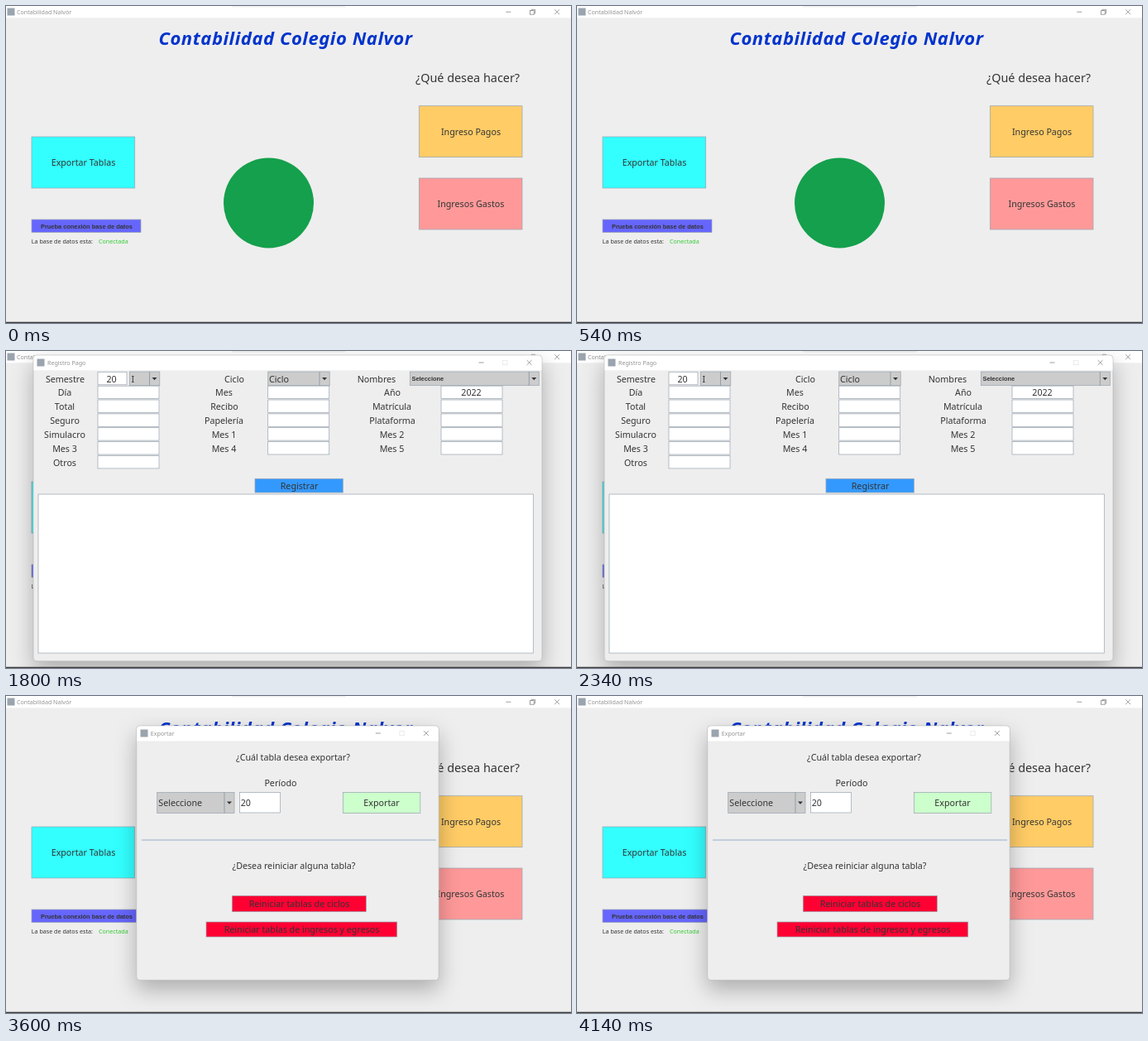
An HTML page that plays this animation: 683x383 px, repeating every 4.5 s.

```html
<!DOCTYPE html>
<html lang="es">
<head>
<meta charset="utf-8">
<title>Contabilidad</title>
<style>
html, body { margin: 0; width: 100%; height: 100%; overflow: hidden; background: #eee; }
svg { display: block; width: 100vw; height: 100vh; }
text { font: 10.7px "Noto Sans", sans-serif; fill: #333; text-anchor: middle; }
.l, .cap, .small { text-anchor: start; }
.cap { font-size: 7.1px; fill: #939393; }
.small { font-size: 7.15px; }
.ask { font-size: 14.4px; }
.bold { font: bold 7.4px "Liberation Sans", Arial, sans-serif; }
.title { font: italic 600 22px "Noto Sans", sans-serif; letter-spacing: .55px; fill: #03c; }
.sub { font: italic 600 10.8px "Noto Sans", sans-serif; letter-spacing: .3px; }
.box { stroke: #97a3af; stroke-width: .7; }
.field { fill: #fff; }
.combo { fill: #ccc; }
.cell { width: 74px; height: 15.4px; }
.line { stroke: #7a8a99; stroke-width: .7; }
.icon { fill: #9aa4ae; width: 9px; height: 9px; }
.ctl { fill: none; stroke: #858585; stroke-width: .8; }
.frame { fill: #eee; stroke: #b8b8b8; stroke-width: .7; }
.win { opacity: 0; animation: show 4.5s step-end infinite; }
.win > .frame { filter: drop-shadow(0 11px 13px rgba(0, 0, 0, .27)); }
#pagos { animation-delay: -3.6s; }
#pago { animation-delay: -2.7s; }
#gasto { animation-delay: -1.8s; }
#exportar { animation-delay: -.9s; }
@keyframes show {
  0% { opacity: 1; }
  20%, 100% { opacity: 0; }
}
</style>
</head>
<body>
<svg viewBox="0 0 683 383" preserveAspectRatio="none">
  <defs>
    <!-- placed at the right edge and middle of a title bar -->
    <g id="ctl" class="ctl">
      <path d="M-76.500 0h6M-18.300-2.900l5.800 5.800m0-5.800l-5.800 5.800"/>
      <rect x="-47.500" y="-2.700" width="5.400" height="5.400" stroke="#e6e6e6"/>
    </g>
    <path id="arrow" d="M-3-1.600h6l-3 3.400z" fill="#333"/>
  </defs>

  <!-- main window -->
  <rect width="683" height="383" fill="#eee"/>
  <rect width="683" height="14.300" fill="#fff"/>
  <rect x="273" width="138" height="1.500" rx=".7" fill="#f0f0f0"/>
  <rect class="icon" x="1.500" y="2.500"/>
  <text class="cap" x="13" y="9.800">Contabilidad Nalvór</text>
  <g class="ctl">
    <path d="M604.300 7.200h6M663.200 4.300l5.800 5.800m0-5.800l-5.800 5.800M635 5.500v-1.200h4.600v4.600h-1.200"/>
    <rect x="633.600" y="5.600" width="4.600" height="4.600"/>
  </g>
  <text class="title" x="338" y="47.300">Contabilidad Colegio Nalvor</text>
  <text class="ask" x="558" y="92">¿Qué desea hacer?</text>
  <circle cx="317.500" cy="238" r="54.500" fill="#14a04c"/>

  <rect class="box" x="31" y="158" width="124.700" height="62" fill="#3ff"/>
  <text x="93.500" y="193">Exportar Tablas</text>
  <rect class="box" x="499.300" y="120.700" width="124.700" height="62" fill="#fc6"/>
  <text x="562" y="156">Ingreso Pagos</text>
  <rect class="box" x="499.300" y="208" width="124.700" height="62" fill="#f99"/>
  <text x="562" y="243.300">Ingresos Gastos</text>
  <rect class="box" x="31" y="258" width="132" height="15.500" fill="#66f"/>
  <text class="bold" x="97.500" y="268.900">Prueba conexión base de datos</text>
  <text class="small" x="30.800" y="287">La base de datos esta:</text>
  <text class="small" x="112" y="287" style="fill:#3c3">Conectada</text>

  <g id="pagos" class="win">
    <rect class="frame" x="95.500" y="36" width="490.500" height="307.300" rx="4"/>
    <path d="M96 54.500V40q0-3.600 3.600-3.600h482.300q3.600 0 3.600 3.600v14.500z" fill="#fff"/>
    <rect class="icon" x="100" y="40.500"/>
    <text class="cap" x="112" y="47.900">Pagos</text>
    <use href="#ctl" x="586" y="45"/>
    <text class="sub" x="332.500" y="80.300">¿Qué desea hacer?</text>
    <rect class="box" x="126.300" y="116.500" width="172.700" height="62.200" fill="#cf6"/>
    <text x="212.500" y="152">Crear estudiante</text>
    <rect class="box" x="376" y="116.500" width="172.700" height="62.200" fill="#ccf"/>
    <text x="462" y="152">Registrar Pago</text>
    <rect class="box" x="198" y="241" width="293.300" height="62.500" fill="#999"/>
    <text x="345" y="277">Registrar otros pagos o semestres anteriores</text>
  </g>

  <g id="pago" class="win">
    <rect class="frame" x="33" y="5" width="615" height="369.700" rx="4"/>
    <path d="M33.500 23.300V9q0-3.600 3.600-3.600h606.800q3.600 0 3.600 3.600v14.300z" fill="#fff"/>
    <rect class="icon" x="37.500" y="9.500"/>
    <text class="cap" x="50" y="16.800">Registro Pago</text>
    <use href="#ctl" x="648" y="14"/>

    <text x="71.500" y="37.700">Semestre</text>
    <rect class="box field" x="111" y="25.300" width="35" height="15.500"/>
    <text x="127.500" y="37.700">20</text>
    <rect class="box combo" x="149.300" y="25" width="36.500" height="16.700"/>
    <text class="l" x="151.500" y="37.700">I</text>
    <path class="line" d="M173.500 25v16.700"/>
    <use href="#arrow" x="179.500" y="33.500"/>
    <text x="276" y="37.700">Ciclo</text>
    <rect class="box combo" x="316.700" y="25" width="74.500" height="16.700"/>
    <text class="l" x="318" y="37.700">Ciclo</text>
    <path class="line" d="M379 25v16.700"/>
    <use href="#arrow" x="385" y="33.500"/>
    <text x="448" y="37.700">Nombres</text>
    <rect class="box combo" x="488.300" y="25" width="156" height="16.700"/>
    <text class="l bold" x="490.500" y="36.300">Seleccione</text>
    <path class="line" d="M632.300 25v16.700"/>
    <use href="#arrow" x="638.300" y="33.500"/>

    <g class="box field">
      <rect class="cell" x="111" y="42.200"/><rect class="cell" x="316.700" y="42.200"/><rect class="cell" x="526" y="42.200"/>
      <rect class="cell" x="111" y="59"/><rect class="cell" x="316.700" y="59"/><rect class="cell" x="526" y="59"/>
      <rect class="cell" x="111" y="75.900"/><rect class="cell" x="316.700" y="75.900"/><rect class="cell" x="526" y="75.900"/>
      <rect class="cell" x="111" y="92.700"/><rect class="cell" x="316.700" y="92.700"/><rect class="cell" x="526" y="92.700"/>
      <rect class="cell" x="111" y="109.600"/><rect class="cell" x="316.700" y="109.600"/><rect class="cell" x="526" y="109.600"/>
      <rect class="cell" x="111" y="126.500"/>
    </g>
    <text x="71" y="54.400">Día</text><text x="263.500" y="54.400">Mes</text><text x="467" y="54.400">Año</text>
    <text x="562.500" y="54.400">2022</text>
    <text x="71" y="71.300">Total</text><text x="264" y="71.300">Recibo</text><text x="466.500" y="71.300">Matrícula</text>
    <text x="71" y="88.200">Seguro</text><text x="263.500" y="88.200">Papelería</text><text x="467" y="88.200">Plataforma</text>
    <text x="71" y="105">Simulacro</text><text x="263.500" y="105">Mes 1</text><text x="466.500" y="105">Mes 2</text>
    <text x="71" y="121.900">Mes 3</text><text x="263.500" y="121.900">Mes 4</text><text x="466.500" y="121.900">Mes 5</text>
    <text x="71" y="138.800">Otros</text>

    <rect class="box" x="301" y="154.300" width="106.300" height="16.700" fill="#39f"/>
    <text x="354.500" y="166.700">Registrar</text>
    <rect class="box field" x="39" y="173" width="598.300" height="192"/>
  </g>

  <g id="gasto" class="win">
    <rect class="frame" x="102" y="83" width="477.700" height="213" rx="4"/>
    <path d="M102.500 101.300V87q0-3.600 3.600-3.600h469.500q3.600 0 3.600 3.600v14.300z" fill="#fff"/>
    <rect class="icon" x="106.500" y="87.500"/>
    <text class="cap" x="118.500" y="94.800">Registro de Gasto</text>
    <use href="#ctl" x="580" y="92"/>
    <text x="155" y="124">Día</text>
    <text x="273.500" y="124">Mes</text>
    <text x="396" y="124">Año</text>
    <text x="517" y="130.300">Concepto</text>
    <g class="box field">
      <rect x="105" y="148" width="92.700" height="36.800"/>
      <rect x="226.700" y="148" width="92.700" height="36.800"/>
      <rect x="348" y="148" width="92.700" height="36.800"/>
      <rect x="108" y="241.500" width="92.700" height="36.800"/>
      <rect x="226.700" y="241.500" width="248.500" height="36.800"/>
    </g>
    <text x="394.300" y="171">2022</text>
    <rect class="box combo" x="470" y="148" width="93.300" height="37"/>
    <text class="l" x="471.500" y="170.700">Seleccione</text>
    <path class="line" d="M551.300 148v37"/>
    <use href="#arrow" x="557.300" y="166.700"/>
    <text x="155" y="217.700">Valor</text>
    <text x="351" y="217.700">Descripción</text>
    <rect class="box" x="494.500" y="241.500" width="75" height="37.300" fill="#6ff"/>
    <text x="532" y="264.300">Registrar</text>
  </g>

  <g id="exportar" class="win">
    <rect class="frame" x="157.700" y="36" width="365.500" height="307.300" rx="4"/>
    <path d="M158.200 54.500V40q0-3.600 3.600-3.600h357.300q3.600 0 3.600 3.600v14.500z" fill="#fff"/>
    <rect class="icon" x="162.500" y="40.500"/>
    <text class="cap" x="174.700" y="47.900">Exportar</text>
    <use href="#ctl" x="523.300" y="45"/>
    <text x="347" y="78">¿Cuál tabla desea exportar?</text>
    <text x="332" y="109">Período</text>
    <rect class="box combo" x="182.700" y="116.500" width="93.300" height="25"/>
    <text class="l" x="184.300" y="133">Seleccione</text>
    <path class="line" d="M264 116.500v25"/>
    <use href="#arrow" x="270" y="129"/>
    <rect class="box field" x="282.500" y="116.500" width="49" height="24.500"/>
    <text class="l" x="283.700" y="133">20</text>
    <rect class="box" x="407.300" y="116.500" width="93.500" height="25" fill="#cfc"/>
    <text x="454" y="133">Exportar</text>
    <path d="M164 174h356" stroke="#8ea6c8" stroke-width=".9"/>
    <text x="348" y="209">¿Desea reiniciar alguna tabla?</text>
    <rect class="box" x="273.300" y="241.300" width="162" height="19.300" fill="#f03"/>
    <text x="354.500" y="255">Reiniciar tablas de ciclos</text>
    <rect class="box" x="242" y="273" width="230.700" height="18" fill="#f03"/>
    <text x="357.500" y="286.300">Reiniciar tablas de ingresos y egresos</text>
  </g>

  <rect y="381.700" width="683" height="1.300" fill="#3a3a3a"/>
</svg>
</body>
</html>
```
